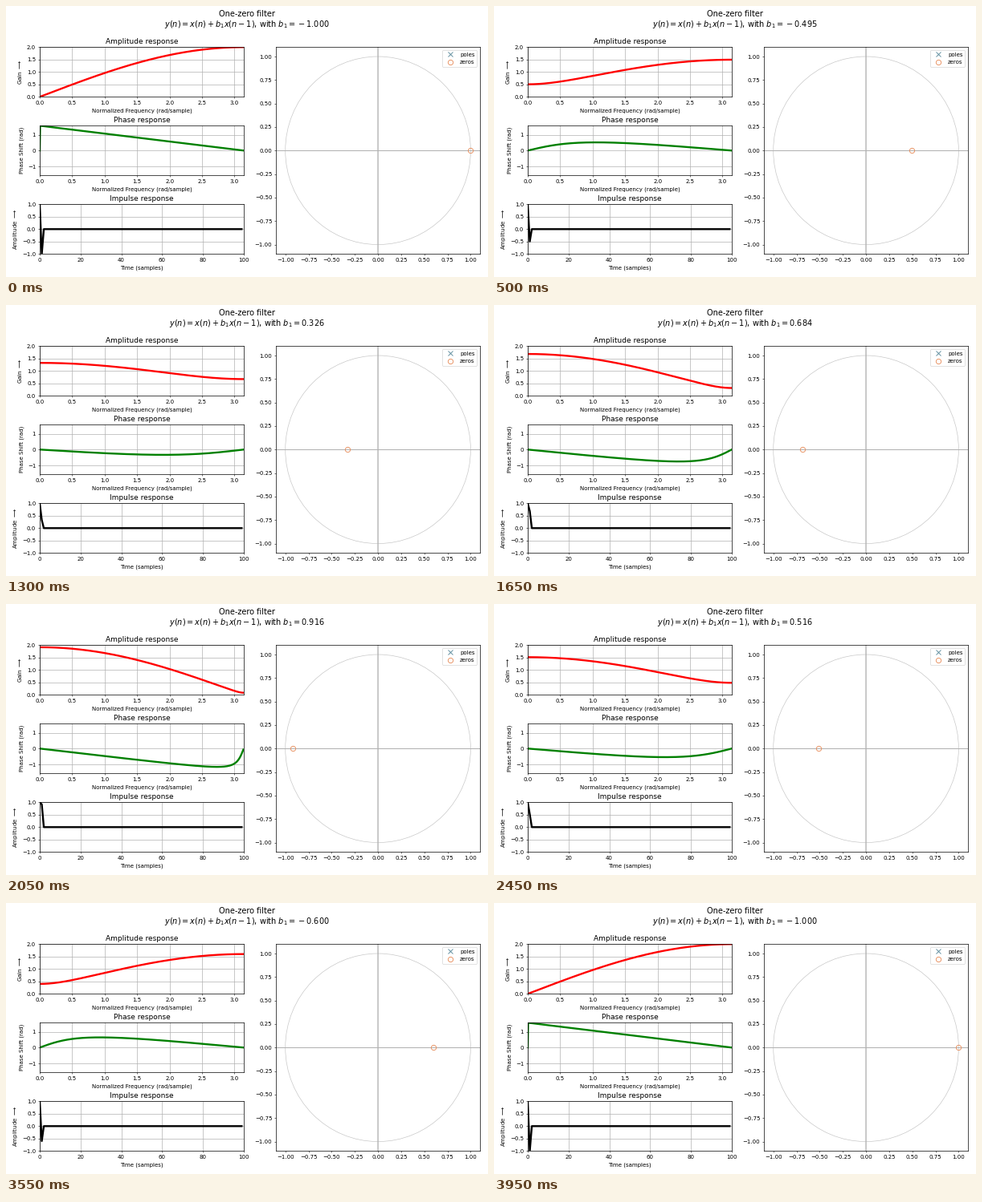
These frames come from a looping animation (600 px wide and 338 px high, 4000 ms). A matplotlib script:

```python
import math

import numpy as np
import matplotlib.pyplot as plt
from matplotlib.animation import FuncAnimation
from matplotlib.patches import Circle

W, H, DPI = 600, 338, 50
FRAMES, INTERVAL = 80, 50
STEPS = 95  # coefficient steps from -1 to 1

plt.rcParams.update({"font.family": "DejaVu Sans", "font.size": 10, "axes.labelpad": 5,
                     "axes.linewidth": 1, "grid.linewidth": 1})
fig = plt.figure(figsize=(W / DPI, H / DPI), dpi=DPI, facecolor="white")


def panel(left, top, right, bottom):
    """Axes placed by pixel edges, measured from the top left."""
    return fig.add_axes([left / W, 1 - bottom / H, (right - left) / W, (bottom - top) / H])


def response(top, title, xlabel, ylabel, xlim, ylim, color):
    ax = panel(42, top, 295.9, top + 62)
    ax.set_title(title, fontsize=13)
    ax.set(xlabel=xlabel, ylabel=ylabel, xlim=xlim, ylim=ylim)
    ax.grid(True)
    return ax, ax.plot([], [], color=color, lw=3.4)[0]


FREQ = "Normalized Frequency (rad/sample)"
w = np.linspace(0, np.pi, 512, endpoint=False)
n = np.arange(100)

ax_amp, amp = response(51.3, "Amplitude response", FREQ, r"Gain $\longrightarrow$",
                       (0, np.pi), (0, 2), "red")
ax_phase, phase = response(149.3, "Phase response", FREQ, "Phase Shift (rad)",
                           (0, np.pi), (-np.pi / 2, np.pi / 2), "green")
ax_imp, imp = response(247.3, "Impulse response", "Time (samples)",
                       r"Amplitude $\longrightarrow$", (0, 100), (-1, 1), "black")
ax_amp.set_yticks(np.arange(0, 2.1, 0.5))
ax_imp.set_yticks(np.arange(-1, 1.1, 0.5))

ax_z = panel(336.2, 51.3, 589.9, 309.3)
ax_z.set(xlim=(-1.1, 1.1), ylim=(-1.1, 1.1))
ticks = np.arange(-1, 1.1, 0.25)
ax_z.set_xticks(ticks)
ax_z.set_yticks(ticks)
ax_z.add_patch(Circle((0, 0), 1, fill=False, color="black", alpha=0.22, lw=1))
ax_z.axvline(0, color="0.7", lw=2, snap=False)
ax_z.axhline(0, color="0.7")
marker = dict(ls="none", ms=9, mew=1.3)
ax_z.plot([], [], "x", color="#5a8a9c", label="poles", **marker)
zero, = ax_z.plot([], [], "o", mfc="none", mec="#e8905f", label="zeros", **marker)
ax_z.legend(loc="upper right")

heading = fig.suptitle("", fontsize=14, y=0.9845, linespacing=1.05)


def coefficient(i):
    """Triangle sweep -1 -> 1 -> -1 in whole steps, 2.4 steps per frame."""
    k = math.ceil(i * 12 / 5)
    return -1 + 2 * min(k, 2 * STEPS - k) / STEPS


def update(i):
    b = coefficient(i)
    h = 1 + b * np.exp(-1j * w)
    amp.set_data(w, np.abs(h))
    phase.set_data(w, np.angle(h))
    imp.set_data(n, np.where(n == 0, 1, np.where(n == 1, b, 0)))
    zero.set_data([-b], [0])
    heading.set_text(f"One-zero filter\n$y(n) = x(n) + b_1x(n-1)$, with $b_1 = {b:.3f}$")
    return amp, phase, imp, zero, heading


anim = FuncAnimation(fig, update, frames=FRAMES, interval=INTERVAL,
                     repeat=True, repeat_delay=0, blit=False)
plt.show()
```
